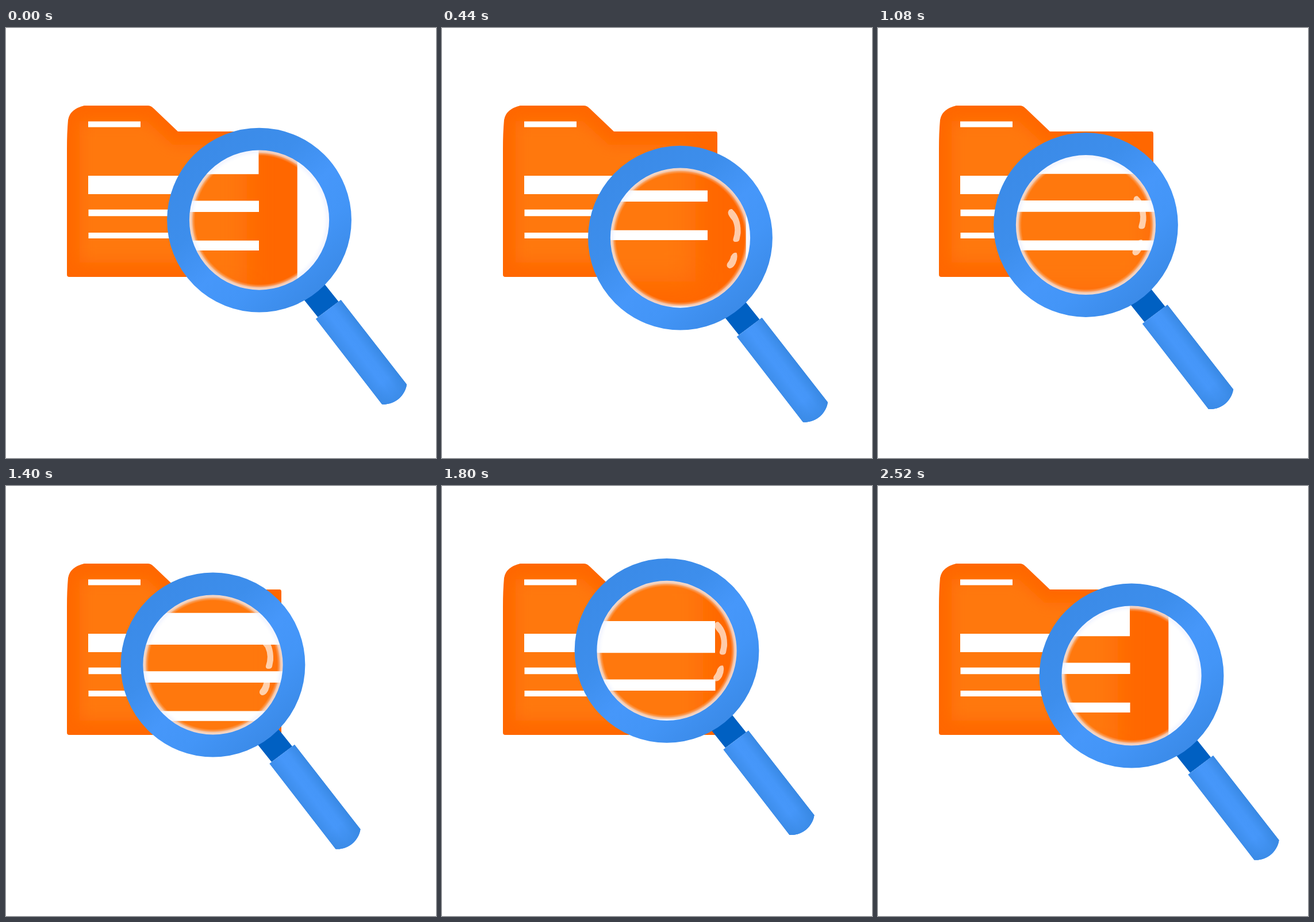
Animation, 748 px wide and 748 px high, one loop 2560 ms. Source, as an HTML page:

```html
<!DOCTYPE html>
<html lang="en">
<head>
<meta charset="utf-8">
<title>Folder search</title>
<style>
  html, body { margin: 0; width: 100%; height: 100%; overflow: hidden; background: #fff; }
  svg { display: block; width: 100%; height: 100%; }
</style>
</head>
<body>
<svg viewBox="0 0 748 748">
  <defs>
    <path id="shape" d="M106 429V210Q106 182 108 160Q111 141 136 135H247Q252 135 257 140L299 180H476Q479 180 479 184V429Q479 433 475 433H110Q106 433 106 429Z"/>
    <clipPath id="shapeClip"><use href="#shape"/></clipPath>
    <clipPath id="glassClip"><circle r="123"/></clipPath>
    <filter id="soft" x="-20%" y="-20%" width="140%" height="140%"><feGaussianBlur stdDeviation="13"/></filter>
    <filter id="edge" x="-20%" y="-20%" width="140%" height="140%"><feGaussianBlur stdDeviation="0.7"/></filter>
    <linearGradient id="ringFill" gradientUnits="userSpaceOnUse" x1="-100" y1="-115" x2="105" y2="115">
      <stop offset="0" stop-color="#3b8be8"/>
      <stop offset=".3" stop-color="#3d8eec"/>
      <stop offset=".55" stop-color="#4697fa"/>
      <stop offset=".75" stop-color="#4395f7"/>
      <stop offset="1" stop-color="#3b8be9"/>
    </linearGradient>
    <linearGradient id="gripFill" gradientUnits="userSpaceOnUse" x1="156" y1="246" x2="199" y2="213">
      <stop offset="0" stop-color="#3d8dea"/>
      <stop offset=".4" stop-color="#4697fa"/>
      <stop offset=".65" stop-color="#4596f8"/>
      <stop offset="1" stop-color="#3989e4"/>
    </linearGradient>
    <linearGradient id="gripEnd" gradientUnits="userSpaceOnUse" x1="216" y1="281" x2="243" y2="316">
      <stop offset="0" stop-color="#3888e2" stop-opacity="0"/>
      <stop offset="1" stop-color="#3888e2" stop-opacity=".8"/>
    </linearGradient>
    <radialGradient id="rim" gradientUnits="userSpaceOnUse" cx="0" cy="0" r="122">
      <stop offset=".915" stop-color="#f0f3ff" stop-opacity="0"/>
      <stop offset=".945" stop-color="#f0f3ff" stop-opacity=".3"/>
      <stop offset=".965" stop-color="#f0f3ff" stop-opacity=".68"/>
      <stop offset="1" stop-color="#f0f3ff" stop-opacity=".82"/>
    </radialGradient>
    <g id="folder">
      <use href="#shape" fill="#ff6700"/>
      <g clip-path="url(#shapeClip)">
        <path d="M128 408V162H245L290 203H428V408Z" fill="#ff780a" filter="url(#soft)"/>
      </g>
      <path d="M143 162.5H234V172.5H143ZM143 257H440V289H143ZM143.5 315.8H440.3V327.2H143.5ZM143.5 356H440.3V366H143.5Z" fill="#fff"/>
    </g>
  </defs>

  <rect width="748" height="748" fill="#fff"/>
  <use href="#folder"/>

  <g id="lens">
    <path d="M78 139L114 112L138 142L102 169Z" fill="#0060c2"/>
    <g id="grip">
      <path id="gripShape" d="M98.5 172L142 139L256.5 286C254 305 236 322 213.5 320.5Z" fill="url(#gripFill)"/>
      <use href="#gripShape" style="fill:url(#gripEnd)"/>
      <path d="M98.5 172L142 139L256.5 286C254 305 236 322 213.5 320.5Z" fill="url(#gripEnd)"/>
    </g>
    <g clip-path="url(#glassClip)">
      <circle r="123" fill="#fff"/>
      <use id="zoomed" href="#folder"/>
      <g fill="#fff" fill-opacity=".66" filter="url(#edge)">
        <path d="M83 -44Q84 -51 90 -50Q106 -36 105 -8L103 3Q102 7 97 7Q91 7 92 2Q98 -15 91 -30Q83 -39 83 -44Z"/>
        <path d="M91 28Q94 25 98 26Q101 34 96 45Q91 54 85 53Q79 50 82 44Q87 38 88 32Z"/>
      </g>
      <circle r="123" fill="url(#rim)"/>
    </g>
    <circle r="141" fill="none" stroke="url(#ringFill)" stroke-width="38.8"/>
  </g>
</svg>
<script>
  const LOOP = 2560, STEP = 40, ZOOM = 1.725;
  const lens = document.getElementById('lens');
  const zoomed = document.getElementById('zoomed');

  // Orbits: centre plus keys of [step, angle in degrees, radius].
  const lensOrbit = {
    x: 400.2, y: 326.2,
    keys: [[0, 11, 41.1], [11, 69.8, 41.4], [27, 157.2, 42], [35, 200.7, 43],
           [45, 257, 40.8], [55, 317.6, 40.3], [63, 365.3, 41], [64, 371, 41.1]]
  };
  const zoomOrbit = {
    x: 468, y: 208,
    keys: [[0, 197.5, 29.9], [11, 256.5, 27.8], [27, 341.5, 29.5], [35, 384, 31.5],
           [45, 435.5, 27.9], [55, 497.6, 23.7], [63, 543.8, 30]]
  };

  function slope(keys, i, c) {
    const a = keys[Math.max(i - 1, 0)], b = keys[Math.min(i + 1, keys.length - 1)];
    return (b[c] - a[c]) / (b[0] - a[0]);
  }

  function sample(keys, n, c) {
    let i = 0;
    while (i < keys.length - 2 && n >= keys[i + 1][0]) i++;
    const a = keys[i], b = keys[i + 1], h = b[0] - a[0], u = (n - a[0]) / h;
    const v = 1 - u;
    return v * v * (1 + 2 * u) * a[c] + u * u * (3 - 2 * u) * b[c]
      + h * u * v * (v * slope(keys, i, c) - u * slope(keys, i + 1, c));
  }

  function place(orbit, n) {
    const angle = sample(orbit.keys, n, 1) * Math.PI / 180;
    const r = sample(orbit.keys, n, 2);
    return [orbit.x + r * Math.cos(angle), orbit.y + r * Math.sin(angle)];
  }

  function draw(ms) {
    const n = Math.floor((ms % LOOP) / STEP);
    const [x, y] = place(lensOrbit, n);
    const [zx, zy] = place(zoomOrbit, n);
    lens.setAttribute('transform', `translate(${x} ${y})`);
    // The orbit carries the top right corner of the wide bar.
    zoomed.setAttribute('transform',
      `translate(${zx - x} ${zy - y}) scale(${ZOOM}) translate(-440 -257)`);
  }

  let start;
  function tick(now) {
    if (start === undefined) start = now;
    draw(Math.max(0, now - start));
    requestAnimationFrame(tick);
  }
  draw(0);
  requestAnimationFrame(tick);
</script>
</body>
</html>
```
